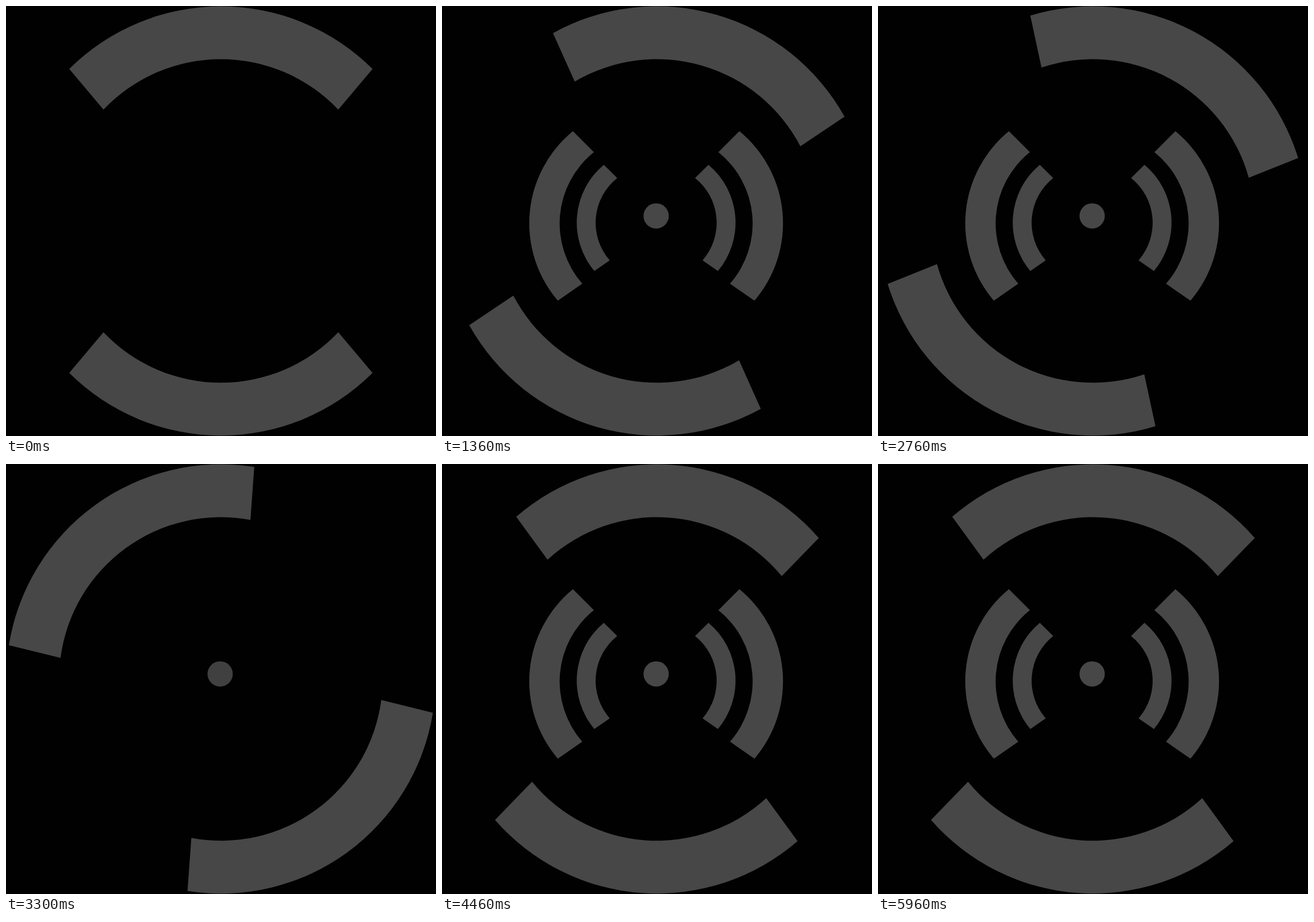
An HTML page that plays this animation: 748x748 px, repeating every 6000 ms.

```html
<!DOCTYPE html>
<html lang="en">
<head>
<meta charset="utf-8">
<title>Signal</title>
<style>
  html, body { margin: 0; width: 100%; height: 100%; overflow: hidden; background: #010102; }
  svg { display: block; width: 100%; height: 100%; }
</style>
</head>
<body>
<svg viewBox="0 0 748 748" fill="#474747">
  <defs>
    <path id="band" d="M-263.8-264.3A373.7 373.7 0 0 1 263.8-264.3L204.2-193.6A281.3 281.3 0 0 0-204.2-193.6Z"/>
    <path id="near" d="M281.5 276.2L304.8 299.2A99.6 99.6 0 0 0 291.7 442.5L265 461A131 131 0 0 1 281.5 276.2Z"/>
    <path id="far" d="M227.7 217.8L264.2 254.2A159 159 0 0 0 244 483L201.5 512.6A207 207 0 0 1 227.7 217.8Z"/>
  </defs>
  <g id="ring">
    <use href="#band"/>
    <use href="#band" transform="rotate(180)"/>
  </g>
  <circle class="signal" cx="372.5" cy="365.2" r="22"/>
  <g class="signal">
    <use href="#near"/>
    <use href="#near" transform="translate(745) scale(-1 1)"/>
  </g>
  <g class="signal">
    <use href="#far"/>
    <use href="#far" transform="translate(745) scale(-1 1)"/>
  </g>
</svg>
<script>
  const LOOP = 6000;
  const FPS = 30;
  const DEGREES_PER_STEP = 4;
  const PULSE_STEPS = 45;
  const FADE_STEPS = 10;

  const ring = document.getElementById('ring');
  const signals = document.querySelectorAll('.signal');
  const clamp = value => Math.min(1, Math.max(0, value));

  // Steps run at 30 per second, starting on whole hundredths of a second.
  const stepAt = time => Math.floor((Math.floor(time / 10) * 10 + 7) * FPS / 1000);

  function draw(time) {
    const step = stepAt(time % LOOP);
    const pulse = step % PULSE_STEPS;
    ring.setAttribute('transform', `translate(373.8 373.9) rotate(${-step * DEGREES_PER_STEP})`);
    signals.forEach((part, i) => {
      part.setAttribute('opacity', clamp(pulse / FADE_STEPS - i));
    });
  }

  const start = performance.now();
  function tick() {
    draw(performance.now() - start);
    requestAnimationFrame(tick);
  }
  tick();
</script>
</body>
</html>
```
